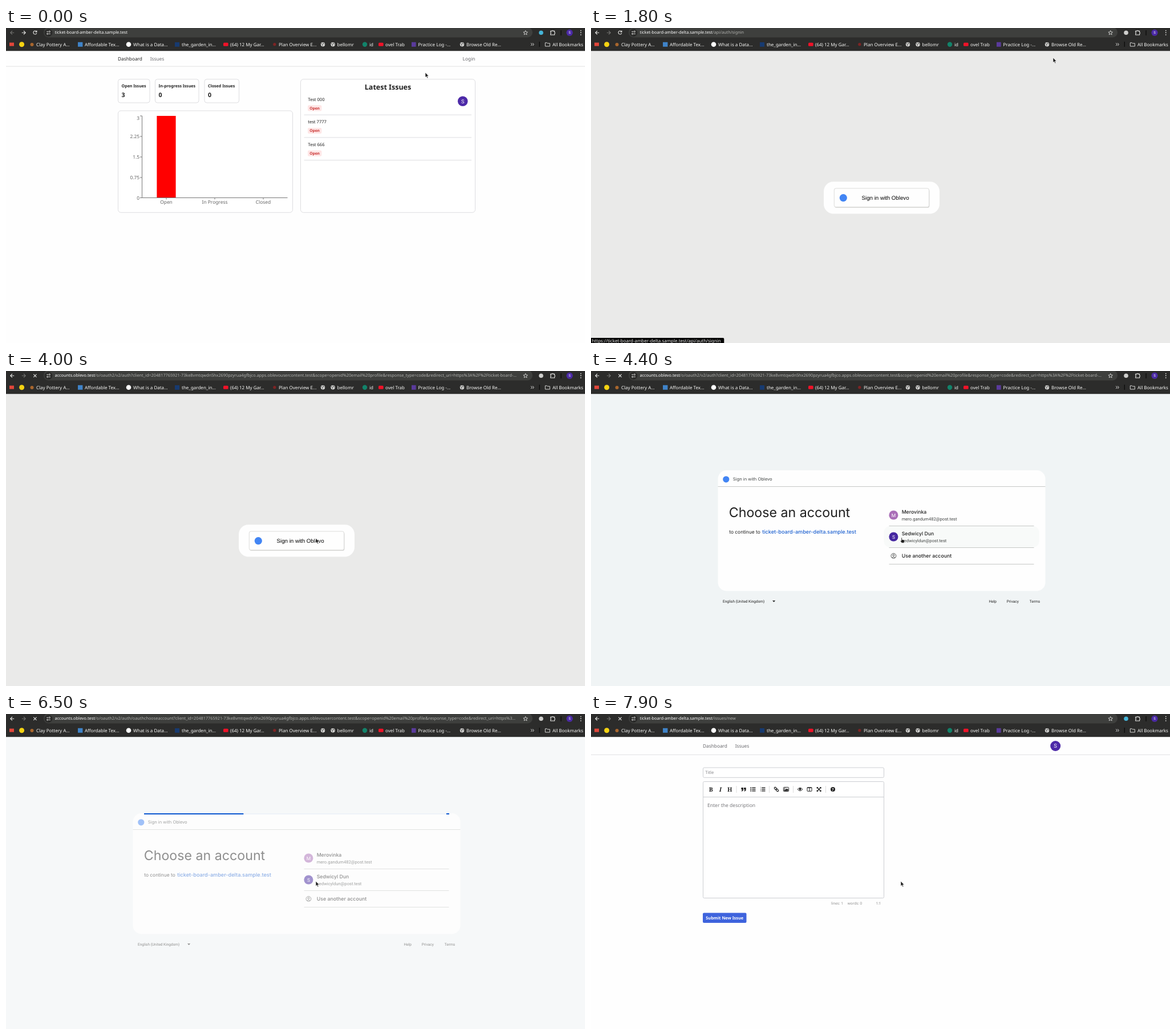
An HTML page that plays this animation: 1015 px wide and 552 px high, repeating every 8 s.

```html
<!DOCTYPE html>
<html lang="en">
<head>
<meta charset="utf-8">
<title>Issue tracker sign-in</title>
<style>
  html, body { margin: 0; width: 100%; height: 100%; overflow: hidden; background: #fefefe; }
  #stage { position: absolute; left: 0; top: 0; width: 1015px; height: 552px; overflow: hidden; }
  svg { position: absolute; left: 0; top: 0; }
  text { white-space: pre; text-rendering: geometricPrecision; }
  #url {
    position: absolute; left: 85.5px; top: 0; width: 811px; height: 16px;
    font: 7.3px/16px "Noto Sans", sans-serif; color: #b0b1ae;
    white-space: nowrap; overflow: hidden; text-overflow: ellipsis;
    text-rendering: geometricPrecision;
  }
  #url b { font-weight: 400; color: #fff; }
  #progress {
    position: absolute; left: 242px; top: 174px; width: 535px; height: 2px;
    overflow: hidden; background: #eef2f8;
  }
  .bar, .bar i { position: absolute; top: 0; width: 100%; height: 100%; }
  .bar i { left: 0; background: #0b57d0; }
  #primary { left: -145.166611%; }
  #secondary { left: -54.888891%; }
</style>
</head>
<body>
<div id="stage">
  <svg id="scene" width="1015" height="552" viewBox="0 0 1015 552"></svg>
  <div id="url"></div>
  <div id="progress">
    <div class="bar" id="primary"><i></i></div>
    <div class="bar" id="secondary"><i></i></div>
  </div>
</div>
<script>
const LOOP = 8000, STEP = 100;
const HOST = 'ticket-board-amber-delta.sample.test';
const BRAND = 'Oblevo';
const UI = "'Noto Sans', sans-serif";
const GEO = 'Inter, sans-serif';
const SMALL = 'Roboto, sans-serif';
const PURPLE = '#4d2aa8';

// Drawing helpers
const text = (x, y, str, size, fill = '#202020', { font = UI, weight = 400, anchor = 'start', more = '' } = {}) =>
  `<text x="${x}" y="${y}" font-family="${font}" font-size="${size}" font-weight="${weight}" text-anchor="${anchor}" fill="${fill}" ${more}>${str}</text>`;
const rect = (x, y, w, h, fill, rx = 0, stroke = 'none', more = '') =>
  `<rect x="${x}" y="${y}" width="${w}" height="${h}" rx="${rx}" fill="${fill}" stroke="${stroke}" ${more}/>`;
const circle = (x, y, r, fill, stroke = 'none', width = 1) =>
  `<circle cx="${x}" cy="${y}" r="${r}" fill="${fill}" stroke="${stroke}" stroke-width="${width}"/>`;
const line = (d, stroke, width = 1, more = '') =>
  `<path d="${d}" fill="none" stroke="${stroke}" stroke-width="${width}" ${more}/>`;
const fillPath = (d, fill) => `<path d="${d}" fill="${fill}"/>`;
const place = (x, y, body) => `<g transform="translate(${x} ${y})">${body}</g>`;
const group = (id, body) => `<g id="${id}">${body}</g>`;
const avatar = (x, y, r, letter, fill = PURPLE) =>
  circle(x, y, r, fill) +
  text(x, y + r * .38, letter, r * 1.06, '#fff', { font: SMALL, anchor: 'middle' });

const globe = x => place(x, 28.7,
  circle(0, 0, 3.7, '#d9d9d7') +
  line('M-2.8 -1.2Q-1 -1.4 -.6 .3T-1 2.8M.4 -3Q0 -.8 2.8 -.6', '#2c2c2b', .9));

const bookmarks = [
  [53, 'Clay Pottery A...'], [138, 'Affordable Tex...'], [223, 'What is a Data...'],
  [308, 'the_garden_in...'], [393, '(64) 12 My Gar...'], [478, 'Plan Overview E...'],
  [580.5, 'bellomr'], [637, 'id'], [665, 'ovel Trab'],
  [722.5, 'Practice Log -...'], [807, 'Browse Old Re...'], [958, 'All Bookmarks']
];

function browserBar() {
  const light = '#e9e9e7';
  const arrow = 'M3.2 0H-3M0 -3.2L-3.2 0L0 3.2';
  return rect(0, 0, 1015, 40.2, '#2c2c2b') +
    rect(66, -1, 857, 17.6, '#3e3f3d', 8.5) +
    circle(74.5, 8.2, 6.8, '#2a2a29') +
    line('M71.3 6.3H74M77.8 10.2H75.2', light, 1) +
    circle(76.3, 6.3, 1.2, 'none', light, .9) + circle(72.8, 10.2, 1.2, 'none', light, .9) +
    place(11, 8.2, line(arrow, light, 1.1, 'id="back"')) +
    place(31, 8.2, line(arrow, light, 1.1, 'id="forward" transform="scale(-1 1)"')) +
    group('reload', line('M53.2 6A3 3 0 1 0 53.8 9M53.9 4.6V6.9H51.5', light, 1.1)) +
    group('stop', line('M48.3 5.6L53.5 10.8M53.5 5.6L48.3 10.8', light, 1.1)) +
    line('M910.7 4.4L911.8 7L914.5 7.2L912.4 9L913.1 11.7L910.7 10.2L908.3 11.7L909 9L906.9 7.2L909.6 7Z', light, .8) +
    `<circle id="extension" cx="938" cy="8.2" r="3.8"/>` +
    line('M954.7 5.4H957A1.3 1.3 0 0 1 959.5 5.4H961.6V7.6A1.3 1.3 0 0 1 961.6 10V12H954.7V9.8A1.3 1.3 0 0 0 954.7 7.5Z', light, 1.1) +
    rect(972.3, 4, 1.4, 9, '#0d0d0d') +
    avatar(988, 8.2, 5.6, 'S', '#4b2aa5') +
    [4.6, 8.2, 11.8].map(y => circle(1007.7, y, .9, light)).join('') +
    rect(6, 25.6, 8, 6, '#e2473a') +
    circle(27.6, 28.7, 4.5, '#f6d312') +
    circle(45.5, 28.9, 3, '#a8662d') +
    rect(126, 24.8, 8.4, 8, '#3f83c8') +
    circle(215, 28.7, 4.3, '#fff') +
    rect(296, 25, 8, 7.8, '#173a70') +
    rect(381, 25.8, 8.6, 6, '#f01228', 1.5) +
    circle(470.8, 28.7, 2.6, '#7e2424') +
    [555.5, 573, 799.5].map(globe).join('') +
    circle(629, 28.7, 4.2, '#12836a') +
    rect(653, 25.8, 8.6, 6, '#f01228', 1.5) +
    rect(711, 24.8, 7.6, 8, '#5a3a9c') +
    bookmarks.map(([x, label]) => text(x, 31.5, label, 8, '#fafaf8')).join('') +
    line('M920.3 26.4L922.3 28.7L920.3 31M923.3 26.4L925.3 28.7L923.3 31', light, 1) +
    rect(934.6, 24, 1.4, 9, '#0d0d0d') +
    line('M945.3 25.8H948.3L949.3 26.9H953.3V32H945.3Z', light, .9);
}

function nav(textY, lineY, dashColor) {
  return text(196, textY, 'Dashboard', 8.3, dashColor) +
    text(252.7, textY, 'Issues', 8.3, '#68686c') +
    line(`M0 ${lineY}H1015`, '#e1e1e3');
}

function dashboard() {
  const border = '#dddde0', axis = '#777';
  const stats = [[196.5, 55.5, 'Open Issues', 3], [261.5, 76.5, 'In-progress Issues', 0], [348, 60.5, 'Closed Issues', 0]];
  const ticks = [[154, 158, '3'], [190, 190, '2.25'], [226, 226, '1.5'], [262, 262, '0.75'], [297.5, 297.5, '0']];
  const columns = [[281, 'Open'], [366, 'In Progress'], [451, 'Closed']];
  const issues = ['Test 000', 'test 7777', 'Test 666'];
  return nav(56.6, 67.2, '#202020') +
    text(800.6, 56.6, 'Login', 8.4, '#68686c', { more: 'id="login-link"' }) +
    stats.map(([x, w, label, count]) =>
      rect(x, 89.8, w, 41.2, '#fff', 4, border) +
      text(x + 6, 104.2, label, 7.1, '#202020', { weight: 600 }) +
      text(x + 6, 121, count, 10.6, '#202020', { weight: 700 })).join('') +
    rect(196.5, 145, 306, 178.3, '#fff', 5, border) +
    rect(516.5, 89.8, 306, 233.5, '#fff', 5, border) +
    ticks.map(([y, labelY, label]) =>
      line(`M235 ${y}H238.5`, axis) +
      text(234, labelY + 3, label, 8.4, '#666', { anchor: 'end' })).join('') +
    columns.map(([x, label]) =>
      line(`M${x} 297.5V300.5`, axis) +
      text(x, 307.7, label, 8.4, '#666', { anchor: 'middle' })).join('') +
    rect(264.4, 154, 33.2, 143.5, '#f00') +
    line('M238.5 154V297.5H493.5', axis) +
    text(669.5, 108.4, 'Latest Issues', 12.5, '#202020', { weight: 700, anchor: 'middle' }) +
    avatar(800.7, 128.2, 8.8, 'S') +
    issues.map((label, i) => place(0, i * 39.7,
      text(529.2, 127.6, label, 7.6) +
      rect(529, 135.2, 24.3, 10.2, '#fee6e6', 2) +
      text(541.1, 142.8, 'Open', 6.6, '#c9302f', { weight: 600, anchor: 'middle' }) +
      line('M522.5 152.2H816', '#dddde0'))).join('');
}

function loginPage() {
  return rect(0, 40, 1015, 512, '#eaeae9') +
    rect(408, 269.3, 203, 56.2, '#fefefe', 17) +
    rect(427, 282.2, 166.4, 32.8, '#d2d2d0', 3.5) +
    rect(426.3, 281, 166.2, 32.8, '#fefefe', 3, '#dcdcda') +
    circle(442.3, 297.6, 6.6, '#4285f4') +
    text(474.6, 301, `Sign in with ${BRAND}`, 9.7, '#000', { font: "'Liberation Sans', sans-serif" });
}

function accountsPage() {
  const ink = '#1f1f1f', soft = '#444746', rule = '#c6c8c6';
  const geo = { font: GEO }, strong = { font: GEO, weight: 500 }, small = { font: SMALL };
  const people = [
    [252.5, 'M', '#aa6fb8', 'Merovinka', 'mero.gandum482@post.test'],
    [290.5, 'S', '#4527a0', 'Sedwicyl Dun', 'sedwicyldun@post.test']
  ];
  return rect(0, 40, 1015, 512, '#f0f4f5') +
    rect(222.5, 174, 574, 211.5, '#fefefe', 15) +
    circle(236.8, 189.8, 5.6, '#4285f4') +
    text(248.8, 192.2, `Sign in with ${BRAND}`, 7.6, soft, geo) +
    line('M222.5 202.5H796.5', rule) +
    text(241.8, 256, 'Choose an account', 23.2, ink, geo) +
    text(242.3, 284.6, 'to continue to', 8.4, ink, geo) +
    text(300.2, 284.6, HOST, 9.15, '#1f62d0', strong) +
    rect(513.5, 272, 272, 37, '#f8faf9', 10, 'none', 'id="row-hover"') +
    people.map(([y, letter, color, name, mail]) =>
      avatar(530.4, y, 8, letter, color) +
      text(544.7, y - 3, name, 8.7, ink, strong) +
      text(544.7, y + 9.2, mail, 7.6, soft, small)).join('') +
    circle(530.4, 324, 4.4, 'none', soft, .9) + circle(530.4, 322.9, 1.5, 'none', soft, .9) +
    line('M527.4 327Q530.4 324.9 533.4 327', soft, .9) +
    text(544.7, 327, 'Use another account', 8.8, ink, strong) +
    [271.5, 309.5, 338.5].map(y => line(`M522.5 ${y}H776.5`, rule)).join('') +
    text(231, 405.7, 'English (United Kingdom)', 6.5, ink, small) +
    fillPath('M318 402.3H323.2L320.6 405Z', ink) +
    [[697.5, 'Help'], [728.8, 'Privacy'], [768.8, 'Terms']].map(([x, s]) => text(x, 405.7, s, 6.5, ink, small)).join('') +
    rect(0, 40, 1015, 512, '#fefefe', 0, 'none', 'id="veil"');
}

function formPage() {
  const ink = '#222', border = '#ccced2', gray = '#8b8b8b';
  const letter = (x, s, weight, more = '') =>
    text(x, 135.8, s, 10.4, ink, { font: "'Noto Serif', serif", weight, anchor: 'middle', more });
  const rows = [-2.8, 0, 2.8];
  const list = (x, mark) => place(x, 132, rows.map((y, i) => line(`M-1.8 ${y}H4.5`, ink, 1.4) + mark(y, i)).join(''));
  const quote = dx => fillPath(`M${dx} -3H${dx + 3.6}V.6Q${dx + 3.6} 3.4 ${dx + .4} 3.5V2.2Q${dx + 1.7} 2 ${dx + 1.7} .5H${dx}Z`, ink);
  return nav(59, 71.4, '#68686c') +
    group('form-avatar', avatar(814.2, 56, 9, 'S')) +
    group('form-body',
      rect(196.5, 94, 317, 17.3, '#fff', 2, border) +
      text(200.3, 105.2, 'Title', 7.5, '#858589') +
      rect(196.5, 118.5, 317, 204, '#fff', 2, border) +
      line('M196.5 145.5H513.5', border) +
      letter(210.2, 'B', 700) + letter(226.8, 'I', 600, 'font-style="italic"') + letter(243.2, 'H', 600) +
      place(267.6, 132, quote(-4.2) + quote(.5)) +
      list(284, y => circle(-3.8, y, 1, ink)) +
      list(301, (y, i) => text(-4.6, y + 1.2, i + 1, 3.4, ink)) +
      place(325, 132, `<g transform="rotate(45)">` + rect(-4.6, -1.5, 5, 3, 'none', 1.5, ink, 'stroke-width="1.2"') +
        rect(-.4, -1.5, 5, 3, 'none', 1.5, ink, 'stroke-width="1.2"') + '</g>') +
      place(342, 132, rect(-4.6, -3.6, 9.2, 7.2, 'none', 1, ink) + circle(-2.3, -1.5, 1, ink) +
        fillPath('M-3.7 2.7V1.2L-2 -.2L-1 .7L1.4 -1.8L3.7 .5V2.7Z', ink)) +
      place(366.5, 132, line('M-4.4 0Q0 -5.4 4.4 0Q0 5.4 -4.4 0Z', ink, 1) + circle(0, -.3, 1.9, ink)) +
      place(383, 132, rect(-4, -3.3, 8, 6.6, 'none', .6, ink) + line('M-4 -2.8H4M0 -3V3', ink, 1)) +
      place(399.6, 132, line('M-3 -3L3 3M3 -3L-3 3', ink, 1.4) +
        fillPath('M-4 -4H-.9L-4 -.9ZM4 -4V-.9L.9 -4ZM-4 4V.9L-.9 4ZM4 4H.9L4 .9Z', ink)) +
      circle(424, 132, 4, ink) + text(424, 134.6, '?', 7, '#fff', { weight: 700, anchor: 'middle' }) +
      [255, 312.5, 354.5, 411.5].map(x => line(`M${x} 126V138`, '#dcdcdc')).join('') +
      text(204, 163, 'Enter the description', 8.55, '#77777a') +
      [[421, 'lines: 1'], [449.8, 'words: 0'], [499.5, '1:1']].map(([x, s]) => text(x, 334.2, s, 6.4, gray)).join('') +
      rect(196, 348.4, 76.5, 17.6, '#3e63dd', 2) +
      text(234.2, 360, 'Submit New Issue', 7.35, '#fff', { weight: 600, anchor: 'middle' }));
}

const pointer =
  group('arrow', '<path d="M0 0V8.6L2 6.8L3.4 9.9L4.8 9.2L3.4 6.3H6Z" fill="#1c1c1c" stroke="#fff" stroke-width=".6"/>') +
  group('hand', '<path d="M.9 -.8Q1.7 -1.4 2.3 -.6V2.4L5.8 3.1Q6.6 3.4 6.5 4.3L5.9 8.2H1.7L-.9 4.9Q-.7 3.8 .9 4.7Z" fill="#1c1c1c" stroke="#fff" stroke-width=".6"/>');

const pages = { dash: dashboard(), login: loginPage(), accounts: accountsPage(), blank: '', form: formPage() };

document.getElementById('scene').innerHTML =
  rect(0, 0, 1015, 552, '#fefefe') +
  Object.entries(pages).map(([id, body]) => group(id, body)).join('') +
  browserBar() +
  group('status', rect(-4, 543, 237.3, 13, '#050505', 2) +
    text(1.6, 551, `https://${HOST}/api/auth/signin`, 7.95, '#ececea')) +
  group('pointer', pointer);

const el = id => document.getElementById(id);
const show = (id, on) => { el(id).style.display = on ? '' : 'none'; };

// Each track lists [start time, value]; a value holds until the next entry.
const query = `client_id=204817765921-73ke8vmtqwdn5hx2690pzyrua4gfbjco.apps.oblevousercontent.test&amp;scope=openid%20email%20profile&amp;response_type=code&amp;redirect_uri=https%3A%2F%2F${HOST}`;
const address = (host, path = '') => `<b>${host}</b>${path}`;
const authHost = 'accounts.oblevo.test';
const tracks = {
  page: [[0, 'dash'], [1800, 'login'], [4400, 'accounts'], [7200, 'blank'], [7700, 'form']],
  url: [
    [0, address(HOST)],
    [1800, address(HOST, '/api/auth/signin')],
    [4000, address(authHost, `/o/oauth2/v2/auth?${query}`)],
    [4500, address(authHost, `/o/oauth2/v2/auth/oauthchooseaccount?${query}`)],
    [7200, address(HOST, '/issues/new')]
  ],
  loading: [[0, false], [1100, true], [1800, false], [3100, true], [4700, false], [5600, true]],
  status: [[0, false], [1000, true], [2000, false]],
  hand: [[0, false], [800, true], [1200, false], [2500, true], [3200, false], [4400, true], [5500, false]],
  extension: [[0, '#45b5d9'], [1800, '#cfcfcd'], [7400, '#45b5d9']],
  rowHover: [[0, '#f8faf9'], [5300, '#e9edf2'], [5500, 'none']],
  veil: [[0, 0], [5400, .15], [5500, .35], [5600, .5]],
  cursor: [
    [0, [735, 78]], [400, [740, 75]], [500, [757, 66]], [600, [784, 57]], [700, [803, 53]], [800, [810, 52]],
    [1900, [804, 60]], [2000, [778, 91]], [2100, [732, 142]], [2200, [676, 199]], [2300, [627, 246]],
    [2400, [592, 276]], [2500, [574, 289]], [2600, [567, 293]], [2700, [560, 293]], [2800, [550, 293]], [2900, [543, 293]]
  ]
};
const valueAt = (track, t) => track.filter(([start]) => start <= t).pop()[1];

// Indeterminate progress: two bars, each with its own slide and stretch.
const PROGRESS_START = 5240;
const keyframes = (rows, css) => rows.map(([offset, v, curve]) => ({
  offset, transform: css(v), easing: curve ? `cubic-bezier(${curve})` : 'linear'
}));
const pausedAnimation = (node, frames) => {
  const animation = node.animate(frames, { duration: 2000, iterations: Infinity });
  animation.pause();
  return animation;
};
const slide = (id, rows) => pausedAnimation(el(id), keyframes(rows, v => `translateX(${v}%)`));
const stretch = (id, rows) => pausedAnimation(el(id).firstElementChild, keyframes(rows, v => `scaleX(${v})`));
const progressAnimations = [
  slide('primary', [[0, 0], [.2, 0, '.5,0,.7017,.4958'], [.5915, 83.67142, '.3024,.3814,.55,.9564'], [1, 200.611]]),
  stretch('primary', [[0, .08], [.3665, .08, '.3347,.1248,.7858,1'], [.6915, .6615, '.06,.11,.6,1'], [1, .08]]),
  slide('secondary', [[0, 0, '.15,0,.5151,.4097'], [.25, 37.6519, '.3103,.2841,.8,.7337'], [.4835, 84.3862, '.4,.627,.6,.902'], [1, 160.2778]]),
  stretch('secondary', [[0, .08, '.205,.0571,.5766,.454'], [.1915, .4571, '.1523,.1964,.6484,1.0043'], [.4415, .728, '.2578,-.0032,.2118,1.3818'], [1, .08]])
];

let shownUrl;
function render(t) {
  const now = {};
  for (const name in tracks) now[name] = valueAt(tracks[name], t);

  for (const id in pages) show(id, id === now.page);
  show('reload', !now.loading);
  show('stop', now.loading);
  show('status', now.status);
  show('arrow', !now.hand);
  show('hand', now.hand);
  show('form-body', t >= 7800);
  show('form-avatar', t >= 7800);
  show('progress', t >= 5400 && t < 7200);

  if (now.url !== shownUrl) el('url').innerHTML = shownUrl = now.url;
  const wentForward = t >= 1800;
  el('back').setAttribute('stroke', wentForward ? '#e9e9e7' : '#747472');
  el('forward').setAttribute('stroke', wentForward ? '#747472' : '#e9e9e7');
  el('extension').setAttribute('fill', now.extension);
  el('login-link').setAttribute('fill', t >= 700 ? '#202020' : '#68686c');
  el('row-hover').setAttribute('fill', now.rowHover);
  el('veil').setAttribute('opacity', now.veil);
  el('pointer').setAttribute('transform', `translate(${now.cursor})`);
  for (const animation of progressAnimations) animation.currentTime = Math.max(0, t - PROGRESS_START);
}

const start = performance.now();
function tick() {
  const elapsed = (performance.now() - start) % LOOP;
  render(Math.floor(elapsed / STEP) * STEP);
  requestAnimationFrame(tick);
}
tick();
</script>
</body>
</html>
```
